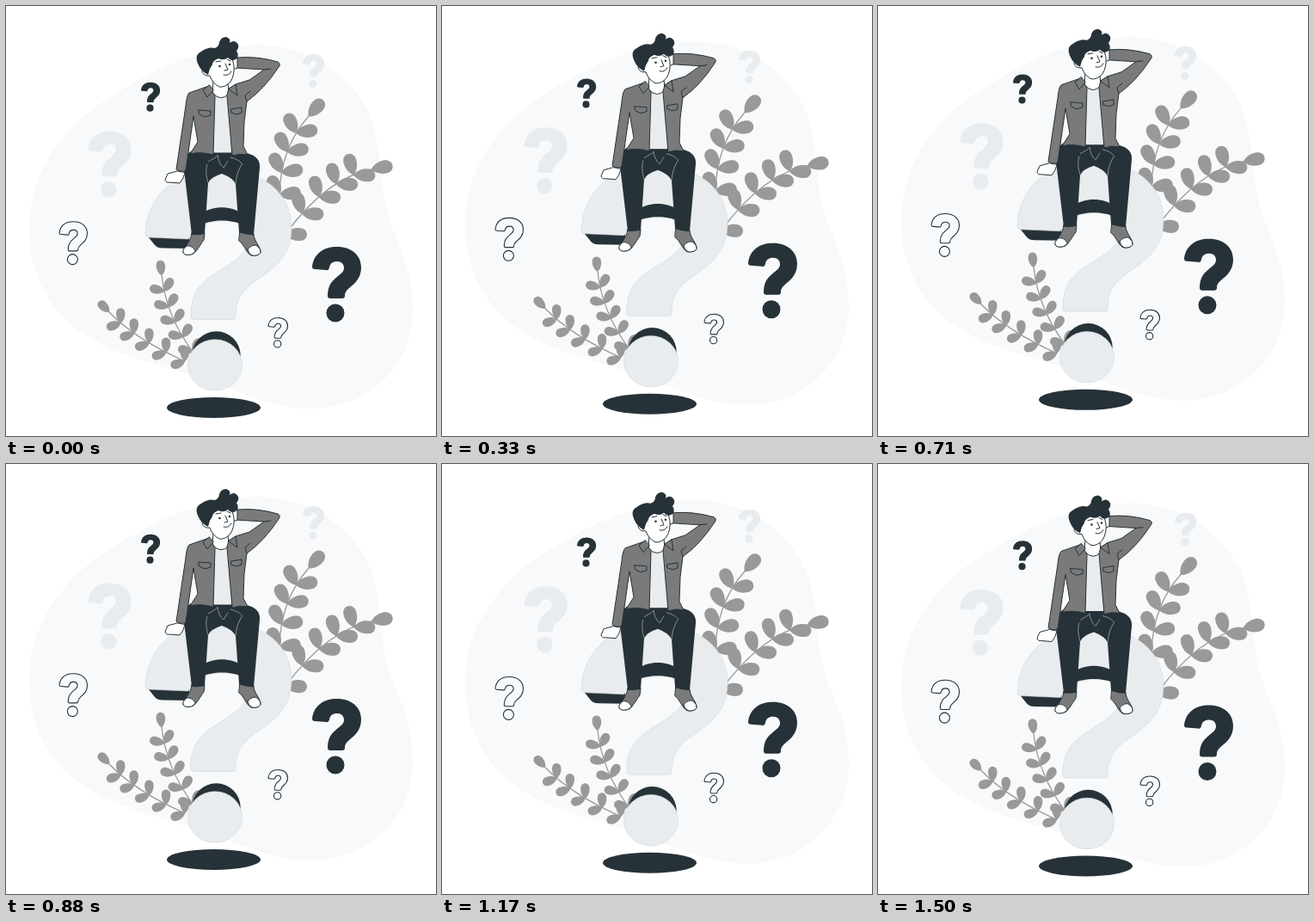
Write an HTML page that moves like this. It is 500 px wide and 500 px high and loops after 1.54 s.

```html
<!DOCTYPE html>
<html lang="en">
<head>
<meta charset="utf-8">
<title>Thinking</title>
<style>
  html, body { margin: 0; width: 100%; height: 100%; overflow: hidden; background: #fff; }
  svg { display: block; width: 100vw; height: 100vh; }
  .dark { fill: #263238; }
  .pale { fill: #e8ecef; }
  .jacket { fill: #7a7a7a; }
  .skin { fill: #fff; }
  .edge { stroke: #d3d8db; stroke-width: .6; }
  .ink { stroke: #263238; stroke-width: 1; stroke-linejoin: round; stroke-linecap: round; }
  .line { fill: none; }
  .hollow { fill: none; stroke: #263238; stroke-width: 1.1; }
  #mark * { vector-effect: non-scaling-stroke; }
  #plants { fill: #999; }
  #plants .stem { fill: none; stroke: #999; stroke-width: 1.3; }
</style>
</head>
<body>
<svg viewBox="0 0 500 500">
  <defs>
    <g id="mark">
      <path d="M0 23C2 8 13 0 29 0C46 0 57 10 57 24C57 37 49 43 43 48C39 51.5 38 54 38 57Q38 60 35 60H21Q18 60 18 57C18 44 24 39 30 34C34 31 37 28.5 37 24.5C37 20 34 17 29 17C24 17 21 19 20 24Q19 28 16 27L3 26Q0 26 0 23Z"/>
      <circle cx="27" cy="77" r="10.5"/>
    </g>
    <path id="leaf" d="M-.5 0C-.25-.3 .1-.32 .28-.27C.55-.18 .55 .18 .28 .27C.1 .32-.25 .3-.5 0Z"/>
  </defs>

  <g id="scene">
    <path fill="#f7f9fb" d="M27 255C28 198 60 150 103 118C160 79 225 45 293 45C350 45 405 80 424 130C437 165 435 205 442 235C452 275 473 300 473 352C473 420 420 468 355 468C310 468 275 450 230 434C175 416 120 405 80 374C43 344 26 300 27 255Z"/>

    <use href="#mark" class="pale" transform="translate(95.5 145.5) scale(.88)"/>
    <use href="#mark" class="pale" transform="translate(345 56) scale(.443)"/>
    <use href="#mark" class="dark" transform="translate(157 88.7) scale(.389)"/>
    <use href="#mark" class="dark" transform="translate(356 280)"/>
    <use href="#mark" class="hollow" transform="translate(62 250.7) scale(.57)"/>
    <use href="#mark" class="hollow" transform="translate(305 362.5) scale(.395)"/>

    <g id="plants"></g>

    <!-- giant question mark -->
    <ellipse class="dark" cx="241.5" cy="467" rx="54.5" ry="12"/>
    <path class="dark" d="M165 268L173 278Q176 281.5 182 281.5L213 282V269Z"/>
    <path class="pale edge" d="M162 266C163 222 196 190 247 190C300 190 332 218 332 258C332 290 312 305 290 320C274 331 267 342 267 362Q267 364.5 264 364.5H218Q215 364.5 215 361C214 335 226 322 243 311C262 299 283 288 283 268C283 255 270 249 250 250C228 251 218 258 212 271L166 269Q162 268 162 266Z"/>
    <path class="dark" d="M228 241C240 232 262 232 274 241V254C262 248 240 248 228 254Z"/>
    <circle class="dark" cx="244.5" cy="406.5" r="28.2"/>
    <ellipse class="pale edge" cx="243" cy="417.5" rx="31.5" ry="29.7"/>

    <!-- shoes and trousers -->
    <g class="ink" transform="translate(0 -1)">
      <path class="jacket" d="M216 265L231 265L230 273C225 280 222 286 218 289Q210 292 206 288C205 283 215 276 216 265Z"/>
      <path class="skin" d="M210 280C215 279 220 283 220 287Q216 291 210 290.5Q205 289 206 285Q207 282 210 280Z"/>
      <path class="jacket" d="M272 264L288 266C288 275 297 281 296 288Q293 292 285 291C279 288 277 278 271 274Z"/>
      <path class="skin" d="M281 284C284 280 289 278 292 280Q297 284 296 288Q293 292 286 291Q282 289 281 284Z"/>
    </g>
    <path class="dark" d="M215 169L262 167L280 171Q296 175 295 188L288 266Q280 267 271 263L267 207Q264 200 251 195Q238 199 235 206L231 265Q223 267 216 266L207 190Q206 174 215 169Z"/>
    <path class="line" stroke="#aeb5b8" stroke-width=".7" d="M246 173Q247 183 253 188L258 180M235 181Q244 176 246 174M261 176Q270 178 274 183M234 184Q231 192 235 206M267 207Q268 193 275 183"/>

    <!-- body -->
    <g class="ink">
      <path class="skin" d="M199 192L188 195L185 202Q186 206 190 205L202 206Q206 202 208 194Z"/>
      <path class="pale" d="M240 99L259 99L263 171L241 171Z"/>
      <path class="skin" d="M241 86L240 101Q250 112 259 102L258 89Z"/>
      <path class="jacket" d="M236 93L213 101Q210 104 209 116L198 190Q204 194 209 191L218 128L223 158L214 172Q226 169 241 173L243 105Z"/>
      <path class="jacket" d="M259 97L267 91L283 86L300 74L268 72Q264 65 269 60Q292 58 316 65Q320 67 317 71Q300 97 280 111L277 135L276 163L281 173Q272 171 263 174L257 104Z"/>
      <path class="line" d="M280 111L278 104L284 99M300 74L308 73"/>
      <path class="jacket" d="M236 92L229 98L234 106L241 98ZM259 96L267 91L269 104L262 99Z"/>
      <path class="line" d="M224 121L238 122L238 127L231 129L225 126ZM262 120L274 118L274 124L268 126L262 124Z"/>
    </g>

    <!-- head -->
    <g class="ink">
      <path class="skin" d="M263 59L269 61L269 72L264 74Z"/>
      <path class="skin" d="M238 63L236 73Q228 71 228 76Q230 82 237 81Q240 90 248 94Q255 95 261 88Q266 80 265 69L262 57Z"/>
      <path class="line" d="M244 65L250 64M257 62L261 64M255 67L258 74L254 75M253 80Q259 82 262 76"/>
    </g>
    <g class="dark">
      <circle cx="248.5" cy="70" r="1.3"/>
      <circle cx="260" cy="68" r="1.3"/>
      <path d="M235 80Q227 76 224 69Q218 57 227 53Q235 47 243 49Q248 47 248 42Q250 36 256 36Q262 38 260 43Q266 38 270 45Q271 49 268 52Q272 59 267 62Q262 65 258 60Q253 64 247 61Q240 64 240 68L237 73Z"/>
    </g>
  </g>
</svg>

<script>
  const PERIOD = 1540, TRAVEL = 10, LEAD = 60, SPREAD = 54;
  const scene = document.getElementById('scene');

  // A stem is a quadratic curve: start, control point, end.
  const branches = [
    { stem: [[318, 220], [319, 165], [352, 128]], size: 26, pairs: 4, lean: -63 },
    { stem: [[325, 265], [373, 200], [425, 190]], size: 26, pairs: 5, lean: -52 },
    { stem: [[217, 402], [186, 360], [181, 313]], size: 18, pairs: 5, lean: -113 },
    { stem: [[208, 413], [151, 388], [120, 356]], size: 18, pairs: 5, lean: -145 }
  ];

  const pointOn = ([a, b, c], t) => [0, 1].map(k =>
    (1 - t) ** 2 * a[k] + 2 * t * (1 - t) * b[k] + t * t * c[k]);

  const leaf = ([x, y], angle, size) =>
    `<use href="#leaf" transform="translate(${x} ${y}) rotate(${angle}) scale(${size}) translate(.48 0)"/>`;

  function plant({ stem, size, pairs, lean }) {
    const [start, bend, end] = stem;
    const tipAngle = Math.atan2(end[1] - bend[1], end[0] - bend[0]) * 180 / Math.PI;
    let svg = `<path class="stem" d="M${start}Q${bend} ${end}"/>` + leaf(end, tipAngle, size);
    for (let i = 0; i < pairs; i++) {
      const base = pointOn(stem, i / pairs);
      svg += leaf(base, lean - SPREAD, size) + leaf(base, lean + SPREAD, size);
    }
    return svg;
  }

  document.getElementById('plants').innerHTML = branches.map(plant).join('');

  function draw(now) {
    const phase = (now + LEAD) % PERIOD / PERIOD;
    const lift = TRAVEL * (1 - Math.abs(1 - 2 * phase));
    scene.setAttribute('transform', `translate(0 ${0.8 - lift})`);
    requestAnimationFrame(() => draw(performance.now()));
  }
  draw(0);
</script>
</body>
</html>
```
